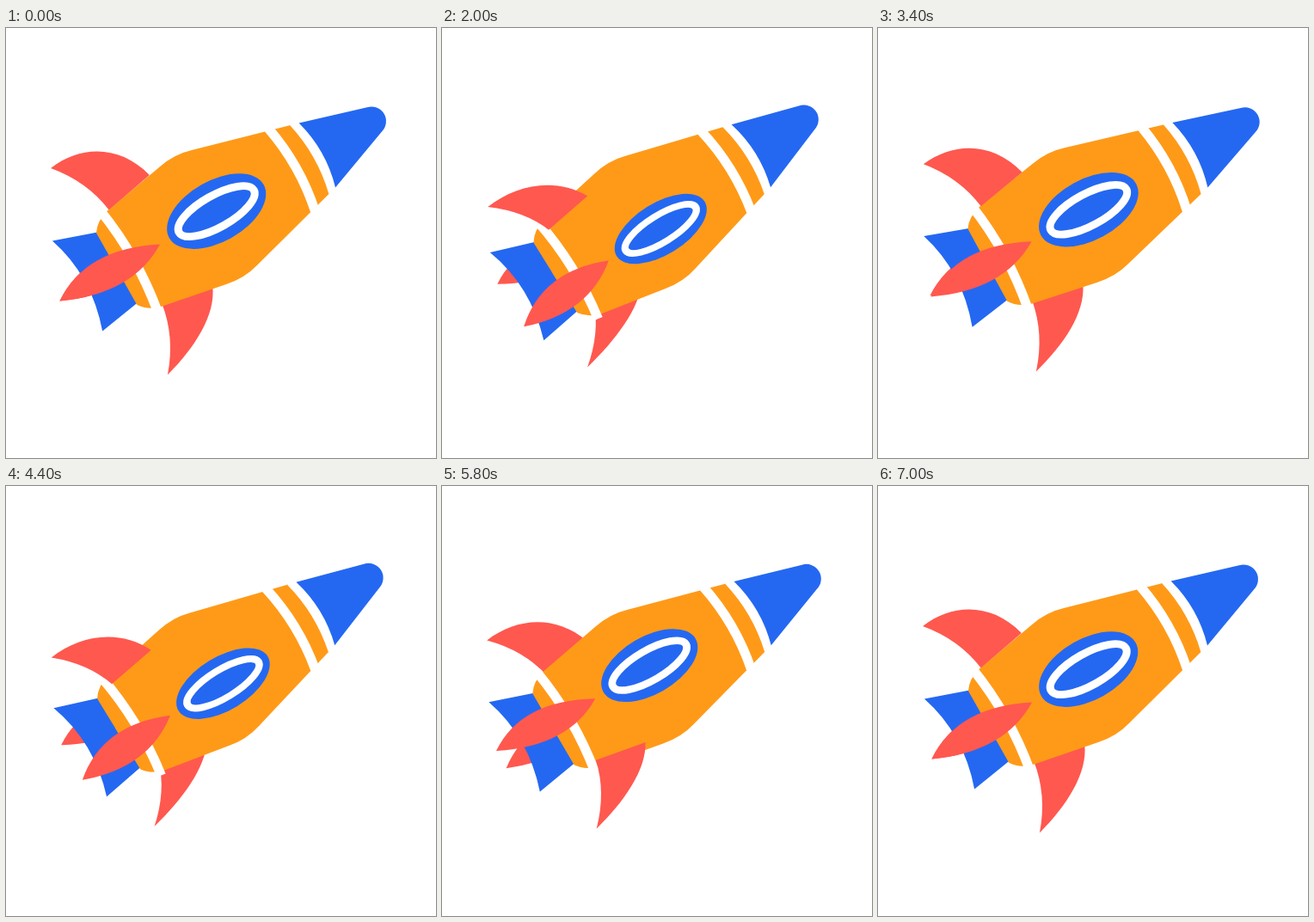
An HTML page with a canvas for the animation above (7.06 s loop, 500 by 500 pixels).

```html
<!DOCTYPE html>
<html>
<head>
<meta charset="utf-8">
<title>Rocket</title>
<style>
html, body { margin: 0; width: 100%; height: 100%; overflow: hidden; background: #fff; }
canvas { display: block; }
</style>
</head>
<body>
<canvas id="stage" width="500" height="500"></canvas>
<script>
const ctx = document.getElementById('stage').getContext('2d');
const ORANGE = '#ff9a18', BLUE = '#2468f2', RED = '#ff584f', WHITE = '#fff';
const LOOP = 7060, STEP = 40, CYCLE = 2320;

// Shapes lie along the x axis, nose to the right, origin at the porthole.
const HALF_BODY = 'M134 8V-43L10-77Q-10-83-32-78.5L-110-64Q-126-60-134-48V8Z';
const NOSE = 'M134-43L212-20A17 17 0 0 1 213 13L134 43Q146 0 134-43Z';
const NOZZLE = 'M-183-65L-130-47V46L-184 55Q-163-7-183-65Z';
const SIDE_FIN = 'M-210 0Q-154-39-76 0Q-132 35-210 0Z';

function fill(path, color, ...matrix) {
  ctx.save();
  if (matrix.length) ctx.transform(...matrix);
  ctx.fillStyle = color;
  ctx.fill(new Path2D(path));
  ctx.restore();
}

// Swings between two extremes, reached in turn at the given times, from rest to rest.
function swing(t, times, first, second) {
  const keys = [0, ...times, CYCLE];
  const value = i => i % (keys.length - 1) ? (i % 2 ? first : second) : 0;
  const i = keys.findIndex(k => k > t);
  const part = (t - keys[i - 1]) / (keys[i] - keys[i - 1]);
  return value(i - 1) + (value(i) - value(i - 1)) * (1 - Math.cos(Math.PI * part)) / 2;
}

function sideFin(roll) {
  fill(SIDE_FIN, RED, 1 - .0024 * Math.abs(roll), -.0034 * roll, 0, 1, 0, .28 * roll);
}

// side: -1 above the axis, 1 below; rolling flattens the fin and sweeps it back
function edgeFin(side, roll) {
  const size = Math.abs(roll), arch = -9 * side;
  fill(`M-143 138C-100 ${135 + arch} -60 ${114 + arch} -47 74.5L-108 62.5Q-114 104 -143 138Z`, RED,
    1, 0, -.005 * size, side * (1 - .007 * size), .2 * size, -1.5);
}

function body() {
  for (const side of [-1, 1]) fill(HALF_BODY, ORANGE, 1, 0, 0, side, 0, 0);
  ctx.strokeStyle = WHITE;
  ctx.lineWidth = 11;
  for (const [x, half] of [[-117, 67], [100, 55], [129, 47]])
    ctx.stroke(new Path2D(`M${x} ${-half}Q${x + 11} 0 ${x} ${half}`));
  fill(NOSE, BLUE);
}

function porthole(roll) {
  const size = Math.abs(roll);
  ctx.save();
  ctx.translate(0, .6 * roll - 1);
  ctx.scale(1 - .0015 * size, 1 - .0053 * size);
  ctx.fillStyle = BLUE;
  ctx.beginPath();
  ctx.ellipse(0, 0, 63, 35.5, 0, 0, 2 * Math.PI);
  ctx.fill();
  ctx.lineWidth = 9;
  ctx.beginPath();
  ctx.ellipse(0, 0, 50, 18.5, 0, 0, 2 * Math.PI);
  ctx.stroke();
  ctx.restore();
}

function draw(now) {
  // The pose rests for one step at both ends of the loop.
  const step = Math.floor(now % LOOP / STEP) - 1;
  const t = Math.min(Math.max(step, 0), 174) * STEP % CYCLE;
  const tilt = swing(t, [300, 595, 790, 1290, 1610, 1910], .078, -.043);
  const roll = swing(t, [410, 750, 1340, 1920], -30, 30);
  const front = roll < 0 ? 1 : -1;

  ctx.clearRect(0, 0, 500, 500);
  ctx.save();
  ctx.translate(377, 208);
  ctx.rotate(tilt);
  ctx.translate(245.2 - 377, 214 - 208);
  ctx.rotate(-29.5 * Math.PI / 180);
  sideFin(-roll);
  fill(NOZZLE, BLUE);
  edgeFin(-front, roll);
  body();
  porthole(roll);
  edgeFin(front, roll);
  sideFin(roll);
  ctx.restore();
}

function tick() {
  draw(performance.now());
  requestAnimationFrame(tick);
}
tick();
</script>
</body>
</html>
```
